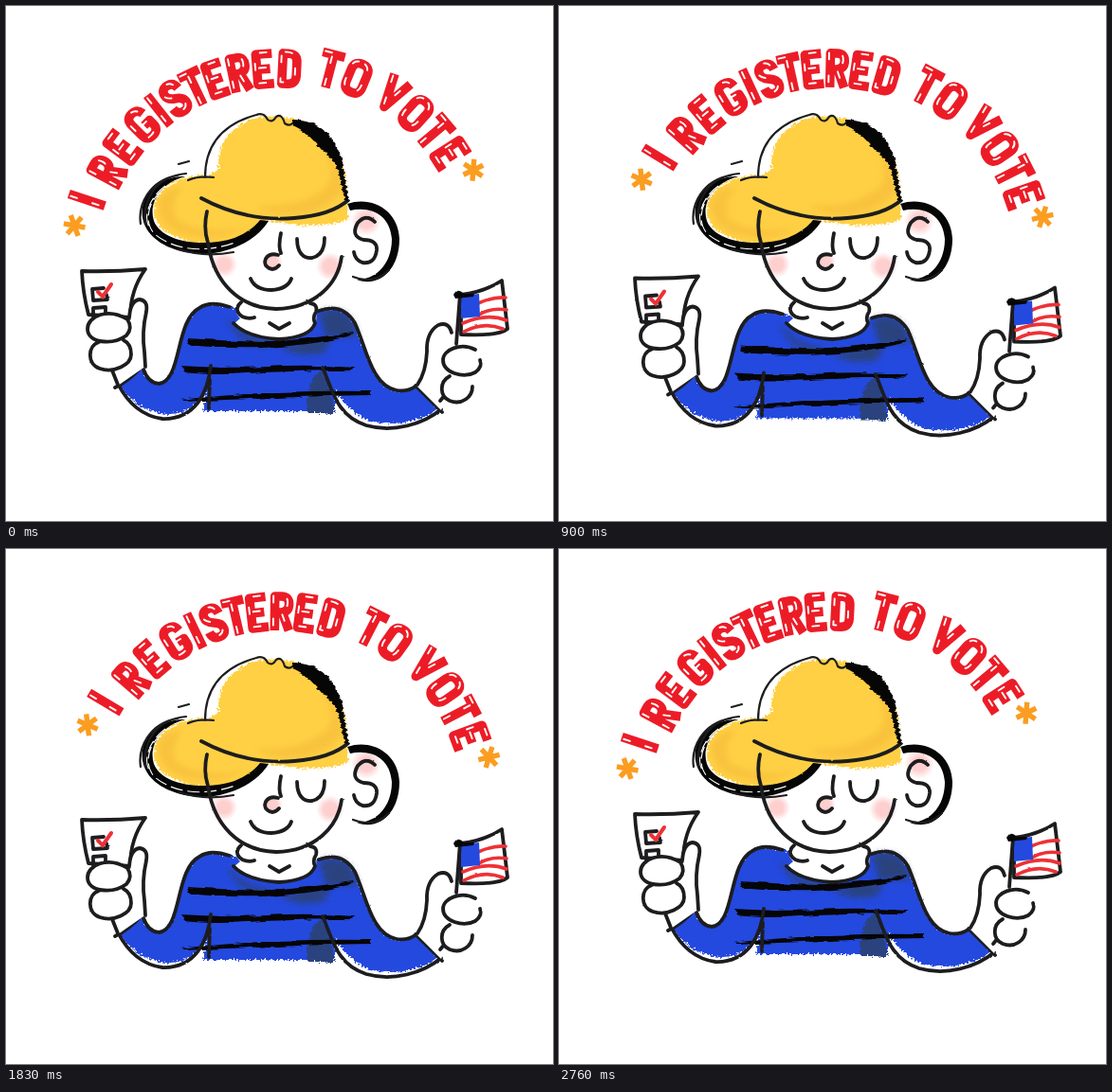
An HTML page for the animation above (2790 ms loop, 577 by 544 pixels).

```html
<!DOCTYPE html>
<html lang="en">
<head>
<meta charset="utf-8">
<title>I registered to vote</title>
<style>
  html, body { margin: 0; width: 100%; height: 100%; overflow: hidden; background: #fff; }
  svg { display: block; width: 100vw; height: 100vh; }
  filter { color-interpolation-filters: sRGB; }
  .ink { fill: none; stroke: #1d1d1f; stroke-width: 3.8; stroke-linecap: round; stroke-linejoin: round; }
  .thin { stroke-width: 2.2; }
  .paper { fill: #fff; }
  .brush { fill: #060606; }
  .scratch { fill: none; stroke: #fff; stroke-width: 1.1; stroke-dasharray: 13 5; }
  .blue { fill: #2449df; }
  .shade { fill: #2a437f; }
  .gold { fill: #ffd044; }
  .amber { fill: #f6bd3b; }
  .red { fill: none; stroke: #ee3136; stroke-linecap: round; }
  #lettering path { fill: none; stroke-linejoin: round; }
  .letter { stroke: #ec1c27; stroke-width: 9.6; }
  .shine { stroke: #fff; stroke-width: 1.9; stroke-linecap: round; stroke-dasharray: 7 17; stroke-dashoffset: -4; }
  .star { stroke: #fb9d20; stroke-width: 5.4; }
</style>
</head>
<body>
<svg viewBox="0 0 577 544" role="img" aria-label="I registered to vote">
  <defs>
    <filter id="rough" x="-10%" y="-10%" width="120%" height="120%">
      <feTurbulence type="fractalNoise" baseFrequency=".15" numOctaves="2" seed="4"/>
      <feDisplacementMap in="SourceGraphic" scale="1.6" xChannelSelector="R" yChannelSelector="G"/>
    </filter>
    <filter id="dry" x="-10%" y="-10%" width="120%" height="120%">
      <feTurbulence type="fractalNoise" baseFrequency=".04 .3" numOctaves="2" seed="7"/>
      <feDisplacementMap in="SourceGraphic" scale="5" xChannelSelector="R" yChannelSelector="G"/>
    </filter>
    <filter id="spray" x="-10%" y="-10%" width="120%" height="120%">
      <feTurbulence type="fractalNoise" baseFrequency=".4" numOctaves="2" seed="9"/>
      <feDisplacementMap in="SourceGraphic" scale="7" xChannelSelector="R" yChannelSelector="G"/>
    </filter>
    <filter id="soft" x="-30%" y="-30%" width="160%" height="160%">
      <feGaussianBlur stdDeviation="3"/>
    </filter>
    <radialGradient id="blush">
      <stop offset=".45" stop-color="#fdcfce"/>
      <stop offset="1" stop-color="#fdcfce" stop-opacity="0"/>
    </radialGradient>
  </defs>

  <g id="lettering"></g>

  <g id="body">
    <g filter="url(#spray)">
      <path class="blue" d="M118 400L143 383Q150 399 162 399C186 396 178 332 205 319Q216 313 240 319L332 322Q354 315 367 335C379 360 385 402 412 407Q424 408 433 402L456 426C436 439 408 445 384 438Q358 428 347 404V428H208L212 402C200 430 180 433 162 430Q136 425 118 400Z"/>
      <path class="shade" filter="url(#soft)" d="M330 324Q354 315 366 334L371 349L338 350ZM233 329L241 337Q252 351 282 354L270 360Q240 352 233 329ZM290 362Q315 352 342 352L336 366Q310 372 290 362Z"/>
      <path class="shade" d="M332 384Q343 403 347 430L318 430Q315 400 332 384Z"/>
    </g>
    <path class="brush" filter="url(#dry)" d="M191 351Q235 354 280 355Q330 350 366 345L362 349Q320 359 270 361Q230 362 193 358ZM186 380Q225 383 275 381Q320 378 368 382L366 385Q320 385 270 387Q220 391 190 387ZM183 416Q230 411 285 408Q340 406 384 407V411Q330 412 285 414Q225 416 188 418Z"/>
    <g filter="url(#rough)">
      <path class="ink" d="M118 399Q135 432 165 436C200 437 213 408 216 380M145 384Q150 398 161 399C186 397 178 332 204 319Q215 311 236 318M330 322Q355 313 368 335C380 360 385 401 412 406Q424 408 433 401M334 382C344 404 348 433 380 443C408 451 440 442 459 426M115 403Q130 396 144 380M432 401L460 429M215 395L214 425"/>

      <path class="ink paper" d="M80 280Q112 281 147 278Q131 300 131 329L87 326Q81 303 80 280Z"/>
      <path class="ink" d="M103 298L91 299L92 311L107 310L106 305M92 328V319L105 318V326"/>
      <path class="red" stroke-width="4" d="M97 302L102 307L111 294"/>
      <path class="paper" d="M130 330Q131 311 141 310Q150 311 148 323Q143 345 146 365L148 380L118 401L112 384Z"/>
      <path class="ink" d="M130 330Q131 311 141 310Q150 311 148 323Q143 345 146 365L147 381M112 385L118 400"/>
      <path class="ink paper" d="M128 331C107 318 86 328 86 341C86 356 112 359 127 348Q134 340 128 331M98 355C86 359 85 378 99 383C114 388 132 379 132 368Q132 357 124 353"/>

      <path class="ink paper" d="M480 305Q505 302 523 290L529 341Q520 349 480 347Z"/>
      <path class="red" stroke-width="3.6" d="M498 314Q514 307 527 308M499 326Q513 318 528 321M482 335Q507 324 528 332M483 344Q504 333 524 341"/>
      <path class="blue" d="M480 306L499 304L500 328L480 330Z"/>
      <path class="ink" d="M479 304L475 357"/>
      <path class="brush" d="M472 305Q476 297 483 304L494 304L493 307L474 309Z"/>
      <path class="paper" d="M470 347Q467 334 456 337Q443 345 444 365Q443 387 433 401L459 427L474 392Z"/>
      <path class="ink" d="M470 345Q467 333 456 337Q443 345 444 365Q443 387 434 400M458 417L463 411"/>
      <path class="ink paper" d="M495 363C480 355 461 363 461 374C461 387 482 394 495 387Q503 381 500 374M468 391C457 397 457 412 468 417C481 422 492 413 492 402"/>
    </g>
  </g>

  <g id="head">
    <g filter="url(#rough)">
      <path class="paper" d="M248 314Q238 321 247 330L240 336Q255 351 288 352Q323 350 327 335L328 315Z"/>
      <path class="ink" d="M248 313C237 322 250 333 262 329M240 335Q254 350 288 352Q321 350 326 335Q323 329 327 323Q329 315 321 314"/>
      <path class="ink" d="M278 335L288 341L299 335"/>
      <path class="paper" d="M356 214C386 203 412 215 413 245C414 277 393 293 370 286L354 272Z"/>
      <path class="paper" d="M211 210V250C218 293 246 319 285 320C326 319 351 293 356 264V200Z"/>
    </g>
    <g fill="url(#blush)">
      <circle cx="230" cy="273" r="14"/>
      <circle cx="342" cy="275" r="15"/>
      <circle cx="380" cy="227" r="16"/>
      <circle cx="281" cy="270" r="11"/>
    </g>
    <g filter="url(#rough)">
      <path class="brush" d="M360 209C386 200 414 216 415 246C415 278 394 298 370 289C391 289 407 272 407 246C405 222 387 211 363 216Z"/>
      <path class="ink" d="M389 228Q380 219 371 229Q363 243 377 247Q392 247 391 258Q389 273 376 271Q368 268 367 260"/>
      <path class="ink thin" d="M366 286Q388 295 404 279"/>
    </g>
    <path class="gold" filter="url(#spray)" d="M212 205Q203 184 224 173Q222 132 263 118Q300 111 328 132Q357 153 359 190L361 225Q340 234 303 231L275 226Q268 240 250 246Q211 260 173 241Q149 228 159 203Q171 179 212 179Z"/>
    <g class="amber" filter="url(#soft)" opacity=".7">
      <path d="M160 207Q169 190 187 192Q171 207 180 226Q212 244 252 233Q226 252 184 240Q159 229 160 207Z"/>
      <path d="M262 211Q320 214 342 186Q346 164 331 143Q354 160 355 196Q340 215 308 220Q280 222 262 211Z"/>
    </g>
    <g filter="url(#rough)">
      <path class="brush" d="M189 180C163 187 150 208 156 227C165 251 212 255 241 245Q260 237 268 226L277 227C264 248 236 262 204 262C163 259 140 238 144 212C149 190 167 180 189 180Z"/>
      <path class="scratch" d="M180 186C150 197 143 227 157 241C177 258 210 262 244 249M168 190C148 205 145 226 152 235"/>
      <path class="ink thin" d="M181 179C151 184 139 210 142 230M190 177C158 180 144 204 147 230M182 257Q210 266 240 260M182 167L193 164"/>
      <path class="ink thin" d="M192 184Q204 179 219 181M210 181C210 147 228 125 264 115Q272 112 276 120Q281 124 285 117Q291 113 294 124Q300 128 304 122"/>
      <path class="ink" d="M206 203Q252 228 304 224Q343 221 361 205"/>
      <path class="ink" d="M212 217Q208 235 213 250C219 292 246 319 285 320C326 319 350 294 354 265M290 240Q287 254 290 261"/>
      <path class="ink" d="M287 263C277 260 271 267 274 274Q281 282 288 274M307 246C307 262 315 267 323 266Q336 263 336 245M258 288Q263 300 280 300Q297 299 301 288"/>
    </g>
    <path class="brush" filter="url(#dry)" d="M302 120Q327 120 342 138Q356 157 357 177L361 206L357 203L351 176Q346 161 333 152Q316 131 302 126Z"/>
  </g>
</svg>
<script>
const NS = 'http://www.w3.org/2000/svg';
const FRAME_MS = 30, FRAMES = 93;
const CENTER = '288.5 272';

const glyphs = {
  I: 'M0-20V20',
  R: 'M-7 20V-16H0Q8-16 8-8Q8 0 0 1H-7M1 1L8 20',
  E: 'M10-16H-7V16H10M-7 0H7',
  G: 'M9-8Q8-16 0-16Q-8-16-8-8V8Q-8 16 0 16Q9 16 9 8V2H1',
  S: 'M8-8Q7-16 0-16Q-8-16-8-9Q-8-3 0 0Q8 3 8 9Q8 16 0 16Q-7 16-8 8',
  T: 'M-12-16H12M0-16V20',
  D: 'M-7-16V16H-1Q8 16 8 7V-7Q8-16-1-16Z',
  O: 'M0-16Q9-16 9-7V7Q9 16 0 16Q-9 16-9 7V-7Q-9-16 0-16Z',
  V: 'M-10-20L0 15L10-20',
  '*': 'M0-11.5V11.5M-10-5.8L10 5.8M-10 5.8L10-5.8'
};

// Each word: its letters, its radius and the angle of every letter.
const words = [
  ['*', 220, [-79.5]],
  ['I', 214, [-71.7]],
  ['REGISTERED', 206, [-61.8, -53.3, -44.7, -38.2, -32.2, -25.6, -19, -12, -4.7, 2.8]],
  ['TO', 212, [14.6, 22.6]],
  ['VOTE', 214, [33.7, 42.2, 49.8, 57.3]],
  ['*', 227, [64.2]]
];

const lettering = document.getElementById('lettering');
const body = document.getElementById('body');

function addGlyph(char, radius, angle) {
  const classes = char === '*' ? ['star'] : ['letter', 'shine'];
  for (const name of classes) {
    const path = document.createElementNS(NS, 'path');
    path.setAttribute('class', name);
    path.setAttribute('d', glyphs[char]);
    const nudge = name === 'shine' ? -1.5 : 0;
    path.setAttribute('transform',
      `translate(${CENTER}) rotate(${angle}) translate(${nudge} ${nudge - radius})`);
    lettering.append(path);
  }
}

for (const [text, radius, angles] of words)
  angles.forEach((angle, i) => addGlyph(text[i], radius, angle));

// Linear swing between 0 and 1; keys are the turning points.
function swing(frame, keys) {
  let i = 0;
  while (i < keys.length - 2 && frame >= keys[i + 1]) i++;
  const part = (frame - keys[i]) / (keys[i + 1] - keys[i]);
  return i % 2 ? 1 - part : part;
}

const textKeys = [0, 22, 45.8, 70, 92];
const bobKeys = [0, 6, 11.5, 17.5, 23, 29, 35, 41, 47, 52, 57, 63, 69.5, 75, 81, 86.5, 92];

function draw(time) {
  const frame = Math.floor(time / FRAME_MS) % FRAMES;
  lettering.setAttribute('transform', `rotate(${20 * swing(frame, textKeys)} ${CENTER})`);
  body.setAttribute('transform', `translate(0 ${9 * swing(frame, bobKeys)})`);
}

const start = performance.now();
function tick() {
  draw(performance.now() - start);
  requestAnimationFrame(tick);
}
tick();
</script>
</body>
</html>
```
